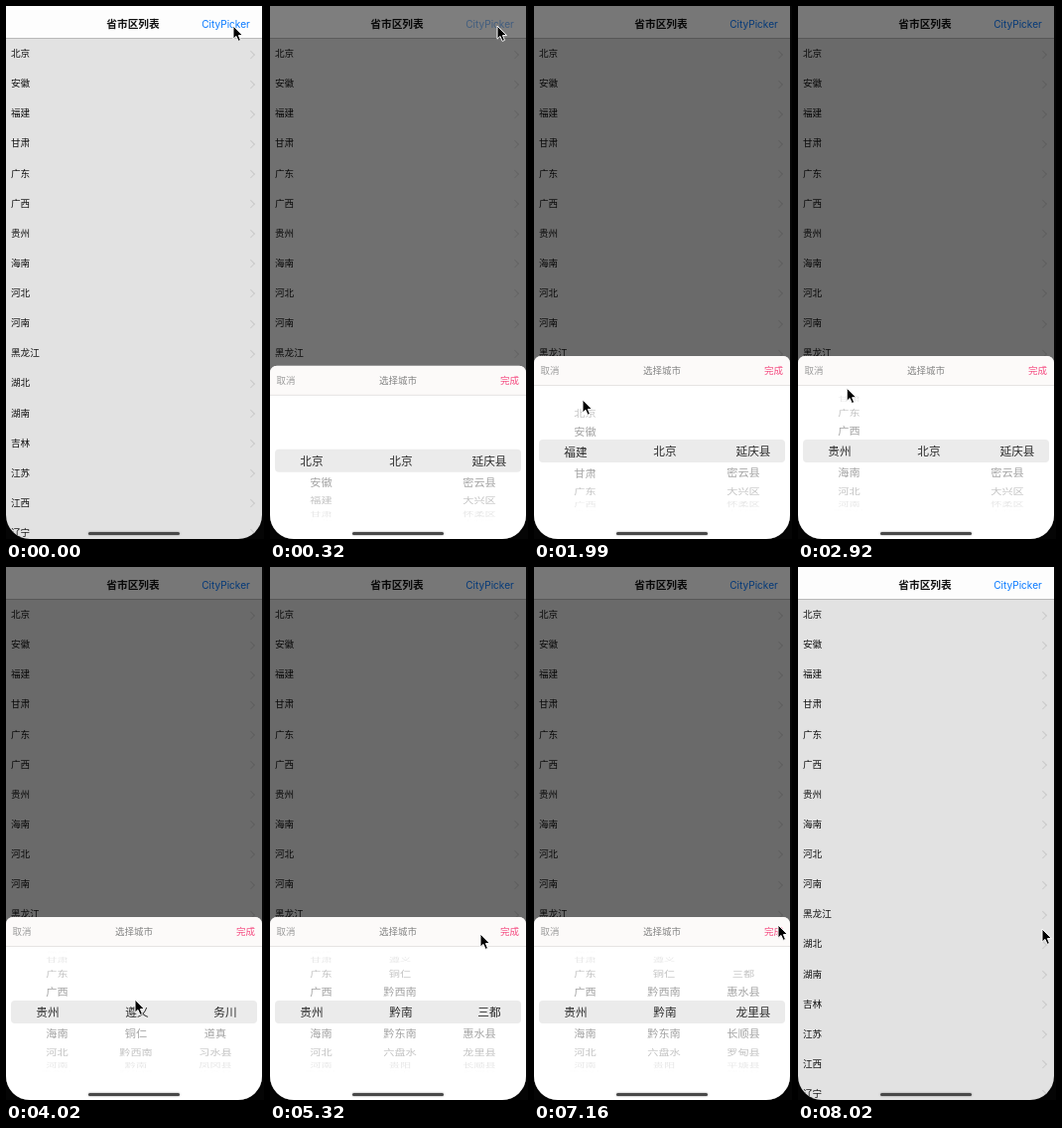
Animation of 260 by 536 pixels, one loop 8050 ms. Source, as an HTML page:

```html
<!DOCTYPE html>
<html lang="zh-CN">
<head>
<meta charset="utf-8">
<title>省市区列表</title>
<style>
html, body { margin: 0; width: 100%; height: 100%; overflow: hidden; background: #000; }
#stage { position: relative; width: 260px; height: 536px; overflow: hidden; background: #050505;
  font-family: "Noto Sans CJK SC", "Noto Sans CJK", sans-serif; color: #111; }
#stage div, #stage svg { position: absolute; }
#stage .text { white-space: nowrap; line-height: 20px; height: 20px; }
#screen { width: 258px; height: 536px; overflow: hidden; background: #e2e2e2; border-radius: 0 0 24px 24px; }
#header { width: 100%; height: 32px; background: #fdfdfd; border-bottom: 1px solid #b9b9b9; }
#title { left: 0; width: 256px; top: 8px; text-align: center; font-size: 10.7px; font-weight: 700; }
#link { left: 181.5px; width: 80px; top: 8px; text-align: center; color: #0a7aff;
  font-family: Inter, Roboto, sans-serif; font-size: 10.1px; }
.item { left: 5px; font-size: 9.6px; }
.chevron { left: 244px; width: 4.5px; height: 4.5px; border: solid #c9c9c9; border-width: 1px 1px 0 0; transform: rotate(45deg); }
#dim { inset: 0; background: rgba(0, 0, 0, .53); }
#sheet { top: 352px; width: 258px; height: 184px; background: #fff; border-radius: 7px 7px 0 0; overflow: hidden; }
#bar { width: 100%; height: 29px; background: #fcfaf9; border-bottom: 1px solid #e6e4e3; font-size: 9.5px; }
#bar .text { top: 4px; color: #9b9b9b; }
#bar .name { left: 0; width: 258px; text-align: center; color: #858585; }
#bar .done { right: 7px; color: #f5487f; }
#band { left: 5px; top: 84px; width: 248px; height: 23px; border-radius: 4px; background: #ebebeb; overflow: hidden; }
.row { width: 80px; margin-left: -40px; margin-top: -10.5px; text-align: center; font-size: 11.2px; color: #7d7d7d; }
#band .row { font-size: 11.7px; color: #2c2c2c; }
#home { left: 82.5px; top: 528.5px; width: 92px; height: 3px; border-radius: 2px; background: #484848; box-shadow: 0 0 2px #8a8a8a; }
</style>
</head>
<body>
<div id="stage">
  <div id="screen">
    <div id="list"></div>
    <div id="header">
      <div id="title" class="text">省市区列表</div>
      <div id="link" class="text">CityPicker</div>
    </div>
    <div id="dim"></div>
    <div id="sheet">
      <div id="wheel"></div>
      <div id="band"></div>
      <div id="bar">
        <div class="text" style="left:6.5px">取消</div>
        <div class="text name">选择城市</div>
        <div class="text done">完成</div>
      </div>
    </div>
    <div id="home"></div>
  </div>
  <svg id="cursor" width="14" height="20" viewBox="-2 -2 14 20">
    <path d="M0 0V13.2L3 10.4L5.1 15.4L7.5 14.4L5.4 9.6H9.5Z" fill="#000" stroke="#fff" stroke-width="1" stroke-linejoin="round"/>
  </svg>
</div>
<script>
const LOOP = 8050;
const $ = id => document.getElementById(id);
const words = s => s.split(' ');

const provinces = words('北京 安徽 福建 甘肃 广东 广西 贵州 海南 河北 河南 黑龙江 湖北 湖南 吉林 江苏 江西 辽宁');
const beijing = ['北京'];
const guizhou = words('遵义 铜仁 黔西南 黔南 黔东南 六盘水 贵阳 毕节 安顺');
const beijingAreas = words('延庆县 密云县 大兴区 怀柔区 平谷区 昌平区');
const zunyiAreas = words('务川 道真 习水县 凤冈县 正安县 湄潭县');
const qiannanAreas = words('三都 惠水县 龙里县 长顺县 罗甸县 平塘县 独山县');

const ease = {
  line: p => p,
  in: p => p * p,
  out: p => 1 - (1 - p) ** 3,
  both: p => p < .5 ? 2 * p * p : 1 - 2 * (1 - p) ** 2
};

// Each step: time, easing into it, values
const cursorPath = [
  [0, 'line', 229, 20], [820, 'line', 229, 20], [1350, 'both', 49, 440],
  [1650, 'line', 49, 440], [1990, 'in', 49, 396], [2250, 'out', 49, 384],
  [2900, 'line', 49, 384], [3500, 'both', 130, 435], [4030, 'line', 130, 435],
  [4350, 'in', 130, 385], [4600, 'out', 130, 369], [4900, 'line', 130, 369],
  [5300, 'both', 212, 369], [5350, 'line', 212, 369], [5620, 'both', 212, 442],
  [5720, 'line', 212, 442], [6050, 'both', 212, 402], [6300, 'line', 212, 402],
  [6800, 'both', 246, 360], [7170, 'line', 246, 360], [7300, 'both', 246, 364]
];
const sheetPath = [[70, 'line', 0], [370, 'both', 1], [7260, 'line', 1], [7560, 'both', 0]];
const linkPath = [[20, 'line', 1], [60, 'line', .3], [320, 'line', .5], [520, 'line', 1]];
const spins = [
  [[1650, 'line', 0], [1990, 'in', 1.94], [3000, 'out', 6]],
  [[4030, 'line', 0], [4350, 'in', 1.6], [4950, 'out', 3]],
  [[5720, 'line', 0], [6050, 'in', 1], [6600, 'out', 2]]
];

function at(path, t) {
  const i = path.findIndex(step => step[0] > t);
  if (i === 0) return path[0].slice(2);
  if (i < 0) return path[path.length - 1].slice(2);
  const [t0, , ...from] = path[i - 1];
  const [t1, kind, ...to] = path[i];
  const p = ease[kind]((t - t0) / (t1 - t0));
  return from.map((v, k) => v + (to[k] - v) * p);
}

function add(parent, className, text = '') {
  const el = document.createElement('div');
  el.className = className;
  el.textContent = text;
  parent.append(el);
  return el;
}

provinces.forEach((name, i) => {
  const y = 48 + i * 30.12;
  add($('list'), 'text item', name).style.top = y - 10.9 + 'px';
  add($('list'), 'chevron').style.top = y - 2.5 + 'px';
});

const makeRows = (parent, n) => Array.from({ length: n }, () => add(parent, 'text row'));
const columns = [[51.5, 42], [131, 132], [211, 221]].map(([x, bandX]) => ({
  x, bandX, rows: makeRows($('wheel'), 9), bandRows: makeRows($('band'), 3)
}));

const STEP = 20.3 * Math.PI / 180, RADIUS = 60.5, MIDDLE = 95.5;

function place(el, text, x, y, scale, opacity) {
  if (el.textContent !== text) el.textContent = text;
  el.style.opacity = opacity;
  el.style.transform = `translate(${x}px, ${y}px) scaleY(${scale})`;
}

function drawColumn(col, names, pos) {
  const mid = Math.round(pos);
  col.rows.forEach((el, k) => {
    const i = mid + k - 4;
    const angle = (i - pos) * STEP;
    const c = Math.max(0, Math.cos(angle));
    place(el, names[i] || '', col.x, MIDDLE + RADIUS * Math.sin(angle), c, .8 * c ** 2);
  });
  col.bandRows.forEach((el, k) => {
    const i = mid + k - 1;
    place(el, names[i] || '', col.bandX - 5, 11 + (i - pos) * 24, 1, 1);
  });
}

function draw(t) {
  const [x, y] = at(cursorPath, t);
  $('cursor').style.transform = `translate(${x - 2}px, ${y - 2}px)`;
  const [open] = at(sheetPath, t);
  $('sheet').style.transform = `translateY(${(1 - open) * 184}px)`;
  $('dim').style.opacity = open;
  $('link').style.opacity = at(linkPath, t)[0];

  const inGuizhou = t >= 3050;
  const areas = !inGuizhou ? beijingAreas : t < 4960 ? zunyiAreas : qiannanAreas;
  [provinces, inGuizhou ? guizhou : beijing, areas]
    .forEach((names, i) => drawColumn(columns[i], names, at(spins[i], t)[0]));
}

const start = performance.now();
function tick() {
  draw((performance.now() - start) % LOOP);
  requestAnimationFrame(tick);
}
tick();
</script>
</body>
</html>
```
